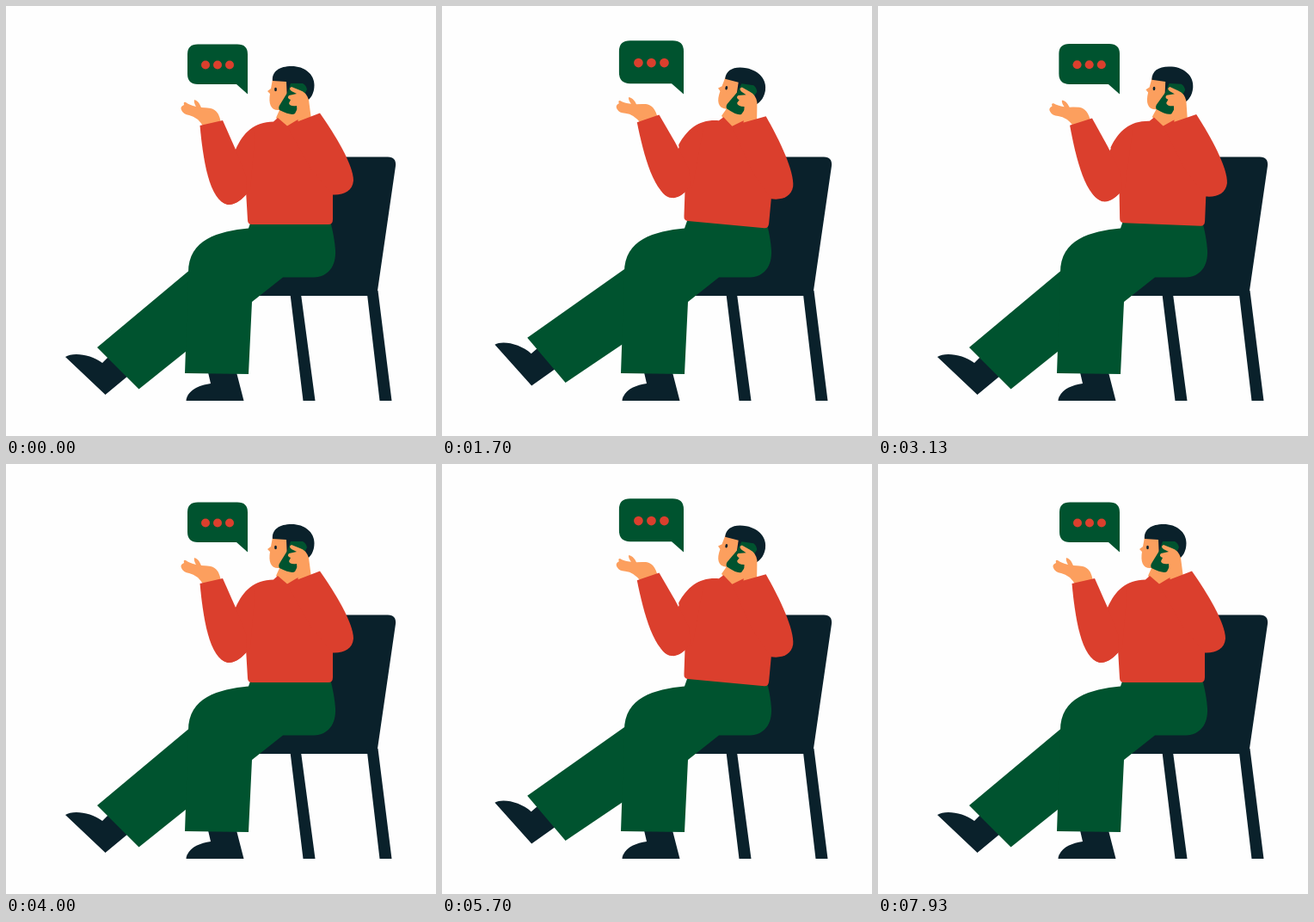
Animation of 500 by 500 pixels, one loop 8010 ms. Source, as an HTML page:

```html
<!DOCTYPE html>
<html lang="en">
<head>
<meta charset="utf-8">
<title>Phone call</title>
<style>
  html, body { margin: 0; height: 100%; overflow: hidden; background: #fefefe; }
  svg { display: block; width: 100vw; height: 100vh; }
  .navy { fill: #0a212b; }
  .green { fill: #00532f; }
  .red { fill: #db3f2d; }
  .skin { fill: #fc9f5e; }
</style>
</head>
<body>
<svg viewBox="0 0 500 500">
  <g class="navy">
    <path d="M350 175.500H444Q454 175.500 453 186L432 331Q431 337 426 337H288L300 312H350Z"/>
    <path d="M330.500 335H343L359.500 459H345.500ZM419.500 331H432.500L448.500 459H434.500Z"/>
    <path d="M235 426L238 439C224 441 211 447 209.500 459H276.500L268 426Z"/>
  </g>

  <g id="leg">
    <path class="navy" d="M69 408C78 402 99 405 112 415L119 408L142 430L115.500 452Z"/>
    <path class="green" d="M225 297.500L106 397L154.500 445.500L240 377L270 330Z"/>
  </g>
  <path class="green" d="M286 247L282 258.500C247 262 212 271 212 310L208 427L282 428L286 344L322 315.500H358C375 315 384 302 383 284Q382 270 378 254L372 246Z"/>

  <g id="torso">
    <g id="head">
      <path class="skin" d="M310 85L308 96L304 99L307 102C305 114 308 122 318 121L314 130L327 142L342 130L345 100L328 84Z"/>
      <path class="navy" d="M310 87C309 76 318 70 332 70C347 70 358.500 79 358.500 92C358.500 102 354 108 349 111L327 112L326 88Z"/>
      <ellipse id="eye" class="navy" cx="313.500" cy="97" rx="1.400" ry="2.300"/>
    </g>
    <path class="red" d="M286 254Q281 254 281 249L279 215L267 167C276 147 288 135 311 134.500L316 130L327 139.500L341 131L366 150L380 217V248Q380 254 375 254Z"/>
    <g id="arm">
      <path class="red" d="M267 167L290 146L284 214C274 226 267 231 258 231C250 229 244 221 241 210Z"/>
      <g id="forearm">
        <path class="skin" d="M230 141L250 137Q248 121 238 119Q230 118 227 118Q224 110 219 109Q218 112 221 117Q213 115 209 112Q206 111 207 115Q202 117 204 121Q206 126 213 127Q223 129 230 141Z"/>
        <path class="red" d="M225.500 139L252 133L267 167L280 200L279 219C271 228 265 231 258 231C236 227 229 177 225.500 139Z"/>
      </g>
    </g>
    <g id="call">
      <path class="green" d="M327 101L331 90L345 90Q349 92 350 97L336 125Q332 128 318 121Q316 118 319 114Z"/>
      <path class="skin" d="M340 138L355 132L352 109Q349 100 342 98L332 94Q328 96 332 99L338 102L329 104Q326 107 331 109L329 113Q330 117 338 116Z"/>
    </g>
    <path class="red" d="M339 134.500L365 124.500C383 150 404 185 404 203C403 215 393 220 380 219.500L355 190L327 140Z"/>
  </g>

  <g id="bubble">
    <path class="green" d="M223 44.500H269Q281 44.500 281 56V102.500L268 91H223Q211 91 211 79V56Q211 44.500 223 44.500Z"/>
    <g class="red">
      <circle cx="232" cy="68.500" r="5"/><circle cx="246" cy="68.500" r="5"/><circle cx="260" cy="68.500" r="5"/>
    </g>
  </g>
</svg>
<script>
  const LOOP = 8010, CYCLE = 4000;
  const part = id => document.getElementById(id);

  // Eased 0..1 ramp between two times.
  const ramp = (t, from, to) => {
    const p = Math.min(1, Math.max(0, (t - from) / (to - from)));
    return (1 - Math.cos(Math.PI * p)) / 2;
  };
  // Rises over a..b, holds, falls over c..d.
  const pulse = (t, a, b, c, d) => ramp(t, a, b) - ramp(t, c, d);

  const pose = (id, transform) => part(id).setAttribute('transform', transform);
  const turn = (id, degrees, x, y) => pose(id, `rotate(${degrees} ${x} ${y})`);
  const zoom = (id, sx, sy, x, y) =>
    pose(id, `translate(${x} ${y}) scale(${sx} ${sy}) translate(${-x} ${-y})`);

  function draw(now) {
    const t = now % LOOP % CYCLE;
    const lean = pulse(t, 30, 900, 2700, 3500);
    const wave = pulse(t, 1000, 1400, 3350, 3930);
    const kick = pulse(t, 930, 1320, 1500, 1960);
    const talk = pulse(t, 950, 1180, 2900, 3200);
    const blink = pulse(t, 2420, 2500, 2560, 2640);

    turn('torso', 5.3 * lean, 330, 252);
    turn('head', 5.5 * lean, 327, 125);
    turn('call', 3 * lean, 345, 135);
    pose('arm', `translate(${4 * lean} ${-2 * lean})`);
    turn('forearm', -7.2 * lean - 4.3 * wave, 260, 208);
    turn('leg', 7.8 * kick, 240, 308);
    const size = 1 + 0.073 * talk;
    zoom('bubble', size, size, 281, 102);
    zoom('eye', 1 + 0.4 * blink, 1 - 0.75 * blink, 313.5, 97);
    requestAnimationFrame(draw);
  }
  draw(0);
</script>
</body>
</html>
```
